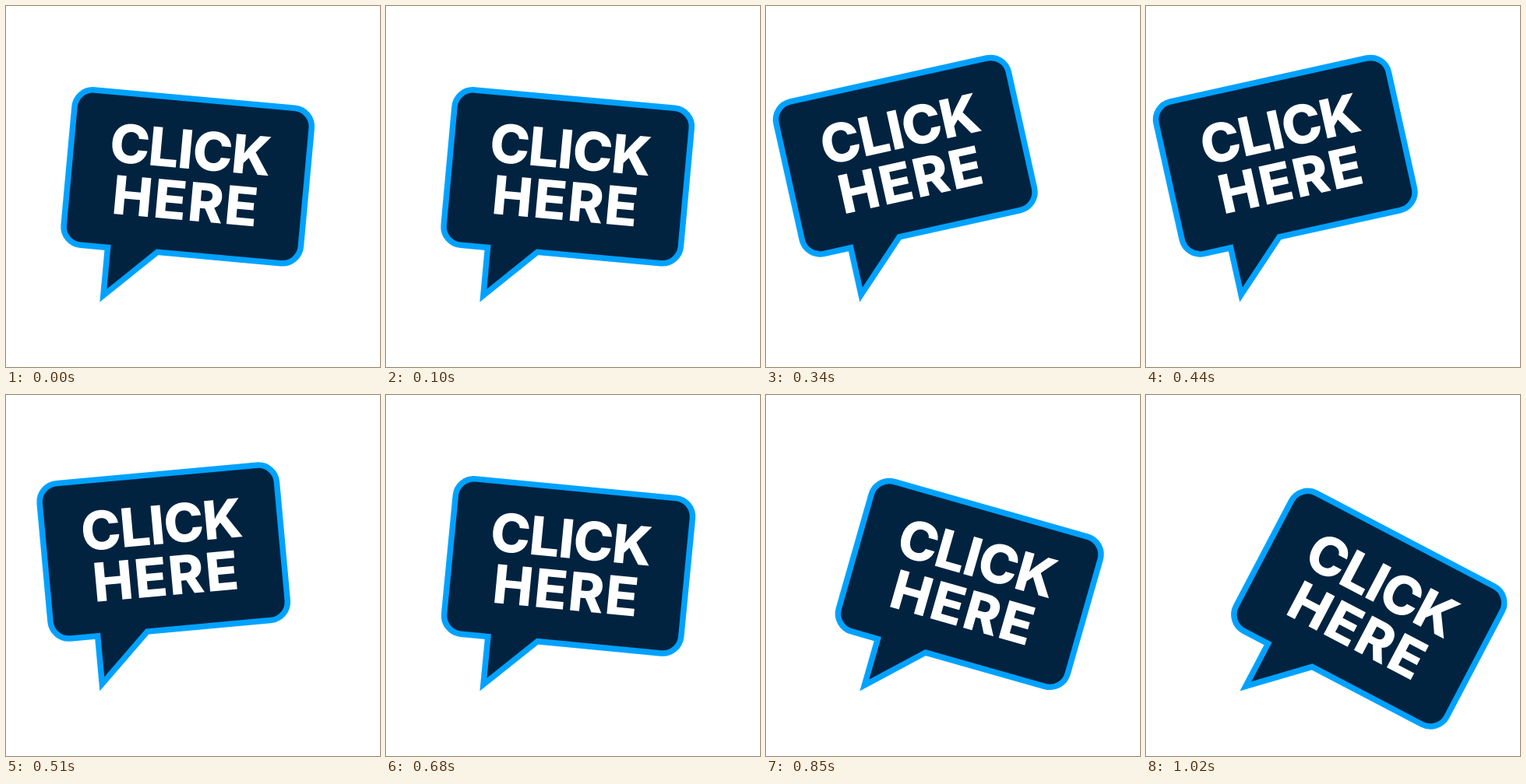
An HTML page for the animation above (1190 ms loop, 480x464 px).

```html
<!DOCTYPE html>
<html lang="en">
<head>
<meta charset="utf-8">
<title>Click here</title>
<style>
  html, body { margin: 0; width: 100%; height: 100%; overflow: hidden; background: #fff; }
  svg { display: block; width: 480px; height: 464px; }
  path { fill: #022340; stroke: #00a2ff; stroke-width: 7.5; stroke-linejoin: miter; }
  text { font: 800 68.8px Inter, "Open Sans", sans-serif; fill: #fff; text-anchor: middle; }
  .tight { letter-spacing: -1px; }
  .loose { letter-spacing: 2px; }
</style>
</head>
<body>
<svg viewBox="0 0 480 464">
  <!-- The tail tip is the origin, so the bubble swings around it -->
  <g id="bubble">
    <path d="M3.6 -8.9 V-70.75 H-31.4 a23.75 23.75 0 0 1 -23.75 -23.75 V-247.2
             a23.75 23.75 0 0 1 23.75 -23.75 H226.6 a23.75 23.75 0 0 1 23.75 23.75 V-94.5
             a23.75 23.75 0 0 1 -23.75 23.75 H67.5 Z"/>
    <text class="tight" x="97.8" y="-181.2">CLICK</text>
    <text class="loose" x="98.2" y="-114.7">HERE</text>
  </g>
</svg>
<script>
  const STEP = 170;
  const angles = [5.2, -5.6, -12.5, -5.2, 5.5, 15.9, 27.7];
  const bubble = document.getElementById("bubble");

  function draw() {
    const pose = Math.floor(performance.now() / STEP) % angles.length;
    bubble.setAttribute("transform", `translate(120.5 380.6) rotate(${angles[pose]})`);
    requestAnimationFrame(draw);
  }
  draw();
</script>
</body>
</html>
```
